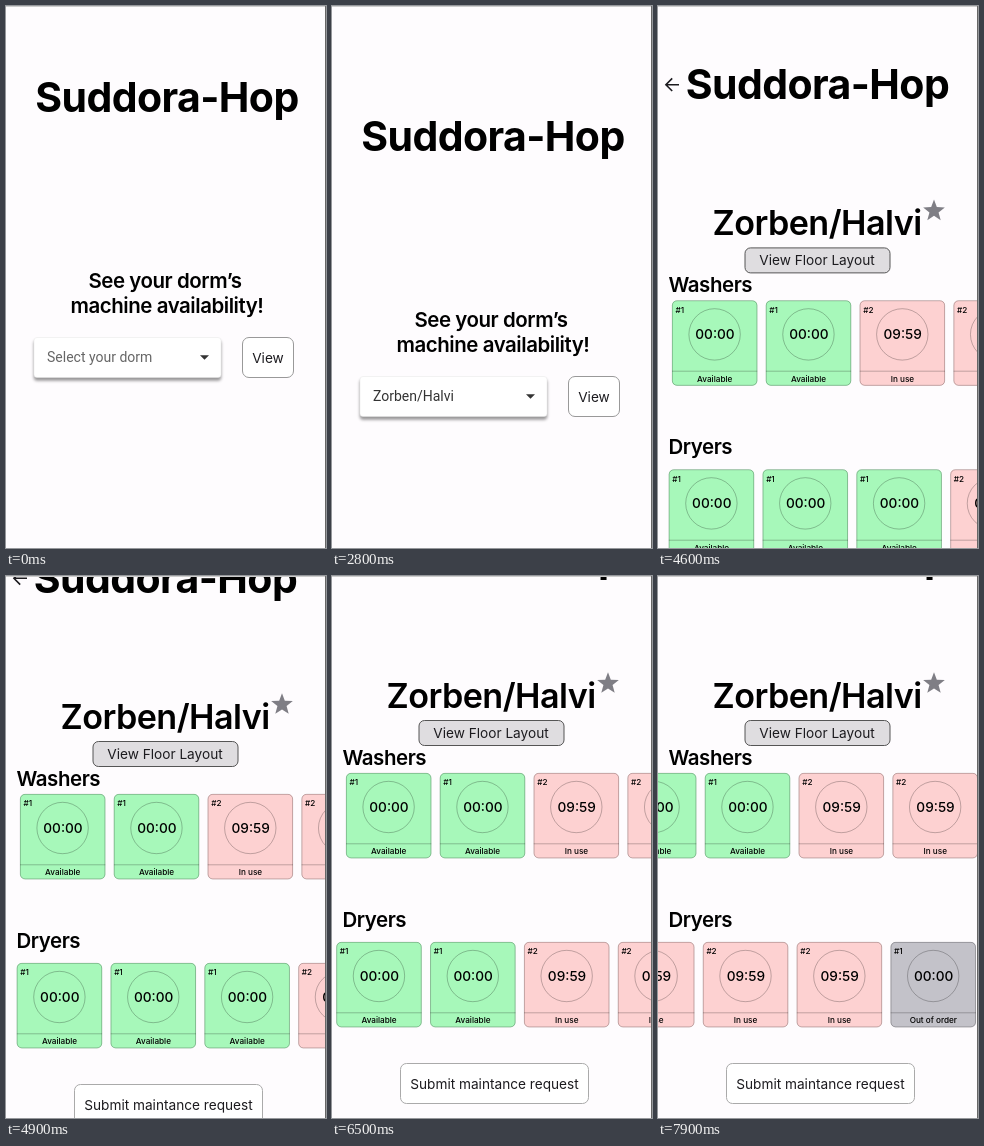
Animation of 320x542 px, one loop 8 s. Source, as an HTML page:

```html
<!DOCTYPE html>
<html lang="en">
<head>
<meta charset="utf-8">
<style>
  html, body { margin: 0; width: 100%; height: 100%; overflow: hidden; background: #fefcfe; }
  svg { display: block; font-family: Inter, sans-serif; }
  .title { font-size: 40.96px; font-weight: 700; letter-spacing: -.014em; }
  .dorm { font-size: 34.13px; font-weight: 600; letter-spacing: -.016em; }
  .head { font-size: 20.48px; font-weight: 600; letter-spacing: -.022em; }
  .label { font-size: 13.65px; fill: #1c1b1f; }
  .time { font-size: 13.65px; font-weight: 500; }
  .small { font-size: 8.19px; font-weight: 500; }
  .field { font: 14px Roboto, sans-serif; }
  .mid { text-anchor: middle; }
  .thin { fill: none; stroke: #000; stroke-opacity: .36; stroke-width: .68; }
  .soft { filter: drop-shadow(0 3px 6px #0005); }
  .raised { filter: drop-shadow(0 3px 1.5px #0006); }
</style>
</head>
<body>
<svg width="320" height="542" viewBox="0 0 320 542">
  <rect width="320" height="542" fill="#fefcfe"/>
  <g id="home">
    <text class="title mid" x="161" y="145">Suddora-Hop</text>
    <text class="head mid" x="159" y="321">See your dorm’s</text>
    <text class="head mid" x="161" y="346">machine availability!</text>
    <rect id="select" x="28" y="370.5" width="187" height="40" rx="3" fill="#fff" stroke="#e4e4e4" stroke-width=".5"/>
    <text id="choice" class="field" x="41" y="395"></text>
    <path id="caret" fill="#333"/>
    <rect x="236.5" y="370.5" width="51" height="40" rx="6.5" fill="#fff" stroke="#999"/>
    <text class="label mid" x="262" y="396">View</text>
    <g id="menu">
      <rect class="soft" x="28" y="418.5" width="187" height="200" rx="5" fill="#fff" stroke="#555"/>
      <path d="M33 461q0 4 4 4h170q4 0 4-4" fill="none" stroke="#e4e4e4"/>
      <path d="M45.5 431.5v27" stroke="#444" stroke-width="1.4"/>
      <text class="field" x="46.5" y="449.5" fill="#777">Find your dorm</text>
      <text class="field" x="44" y="490.5" fill="#333">Zorben/Halvi</text>
      <text class="field" x="44" y="528" fill="#333">Pellod</text>
    </g>
  </g>
  <g id="dorm">
    <path d="M21 130.3H8.5M14.2 124l-6.3 6.3 6.3 6.3" fill="none" stroke="#1c1b1f" stroke-width="1.6"/>
    <text class="title mid" x="159.5" y="145">Suddora-Hop</text>
    <text class="dorm mid" x="159" y="280.7">Zorben/Halvi</text>
    <path id="star" fill="#7f7e85"/>
    <rect x="87" y="293.5" width="145" height="25" rx="5.5" fill="#dfdde0" stroke="#444" stroke-width=".9"/>
    <text class="label mid" x="159" y="311">View Floor Layout</text>
    <text class="head" x="10.5" y="337.5">Washers</text>
    <g id="washers"></g>
    <text class="head" x="10.5" y="499.5">Dryers</text>
    <g id="dryers"></g>
    <rect x="68.5" y="636.5" width="188" height="40" rx="6" fill="#fff" stroke="#aaa"/>
    <text class="label mid" x="162.5" y="661.5">Submit maintance request</text>
  </g>
  <path d="M0 .5H320" stroke="#ccc"/>
  <path d="M319.5 0V542" stroke="#666"/>
</svg>
<script>
const $ = id => document.getElementById(id);
const kinds = {
  free: ['#a7f8ba', '#1', '00:00', 'Available'],
  busy: ['#fdd1d1', '#2', '09:59', 'In use'],
  out: ['#c3c2c9', '#1', '00:00', 'Out of order']
};

function card(kind, i) {
  const [fill, num, time, status] = kinds[kind];
  return `<g transform="translate(${i * 93.85})">
    <rect width="85.3" height="85.3" rx="5" fill="${fill}"/>
    <rect class="thin" x=".34" y=".34" width="84.6" height="84.6" rx="4.7"/>
    <path class="thin" d="M0 70.8H85.3"/>
    <circle class="thin" cx="42.6" cy="34" r="25.7"/>
    <text class="small" x="3.5" y="12.3">${num}</text>
    <text class="time mid" x="43" y="39">${time}</text>
    <text class="small mid" x="42.7" y="81.3">${status}</text></g>`;
}
const fillRow = (id, list) => $(id).innerHTML = list.split(' ').map(card).join('');
fillRow('washers', 'free free busy busy');
fillRow('dryers', 'free free free busy busy busy out');

$('star').setAttribute('d', 'M' + Array.from({ length: 10 }, (_, i) => {
  const r = i % 2 ? 4.8 : 11.4, a = i * Math.PI / 5;
  return `${276 + r * Math.sin(a)} ${256.6 - r * Math.cos(a)}`;
}).join('L') + 'Z');

// Linear interpolation through [time, value] keys
function track(keys, t) {
  const i = keys.findIndex(k => k[0] > t);
  if (i === 0) return keys[0][1];
  if (i < 0) return keys[keys.length - 1][1];
  const [t0, a] = keys[i - 1], [t1, b] = keys[i];
  return a + (b - a) * (t - t0) / (t1 - t0);
}
const homeY = [[100, -39], [200, -53], [300, -68], [500, -68], [600, -54], [1600, -54], [1700, 0]];
const dormY = [[4400, 0], [4500, -22], [4600, -51.6], [4800, -110], [5000, -146], [5200, -159],
  [5400, -162], [5500, -162], [5800, -154], [6100, -149]];
const washX = [[7000, 14], [7200, -13], [7400, -38], [7700, -47]];
const dryX = [[6200, 10.8], [6300, -12], [6500, -89.5], [6700, -185], [6900, -262], [7100, -309], [7400, -330.5]];

const move = (id, x, y) => $(id).setAttribute('transform', `translate(${x} ${y})`);
const show = (id, on) => $(id).style.display = on ? '' : 'none';

function draw(now) {
  const t = Math.floor(now % 8000 / 100) * 100; // ten pictures a second
  const open = t >= 1700 && t < 2800, picked = t >= 2800;
  show('home', t < 3600);
  show('dorm', t >= 3600);
  show('menu', open);
  $('select').setAttribute('class', open ? 'soft' : 'raised');
  $('choice').textContent = picked ? 'Zorben/Halvi' : 'Select your dorm';
  $('choice').setAttribute('fill', picked ? '#333' : '#666');
  $('caret').setAttribute('d', open ? 'M194 393h9l-4.5-4.5z' : 'M194 388.3h9l-4.5 4.5z');
  move('home', 0, track(homeY, t));
  move('dorm', 0, track(dormY, t));
  move('washers', track(washX, t), 346);
  move('dryers', track(dryX, t), 515);
}
const start = performance.now();
function tick() {
  draw(performance.now() - start);
  requestAnimationFrame(tick);
}
tick();
</script>
</body>
</html>
```
